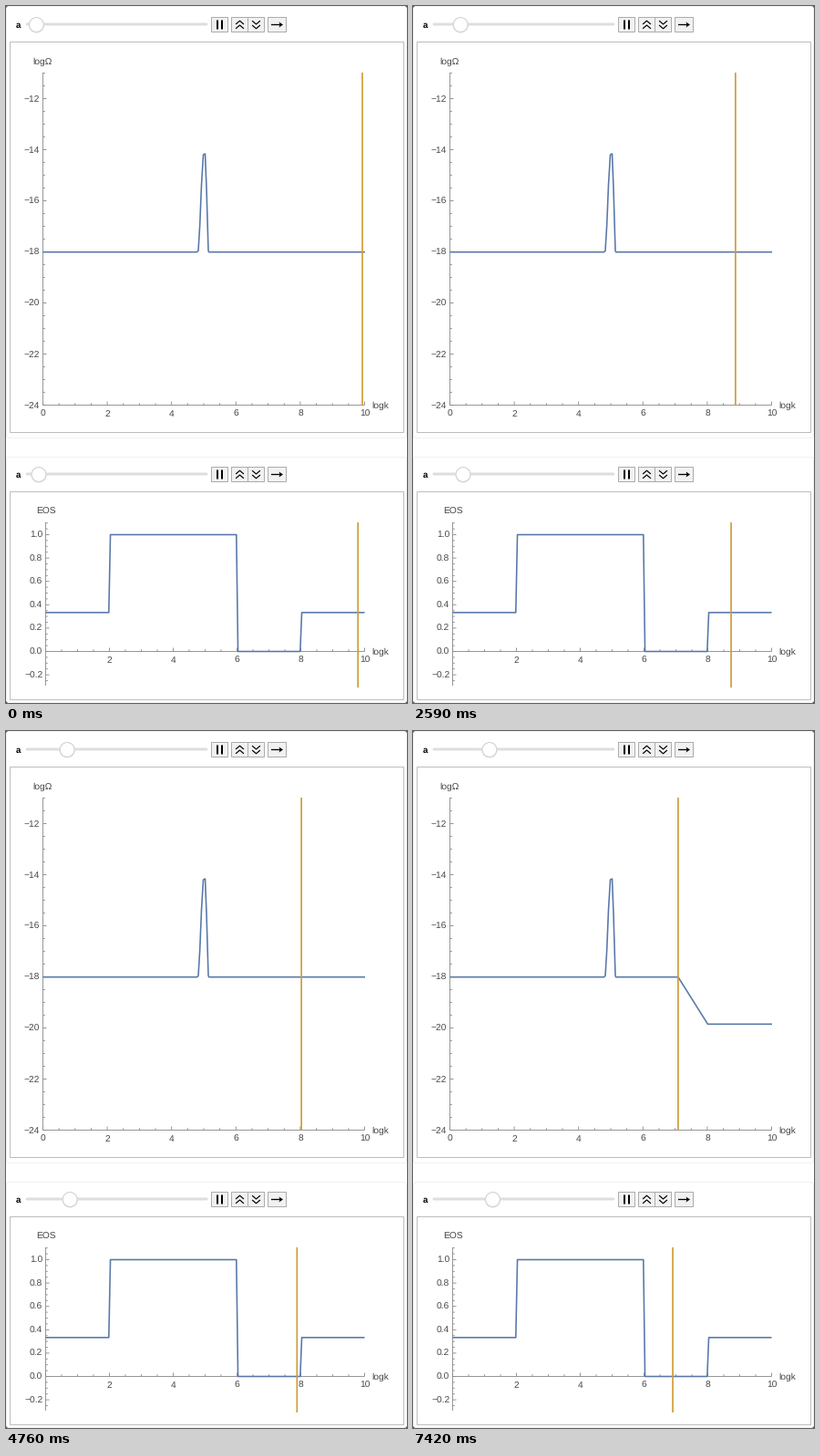
Animation, 440 px wide and 764 px high, one loop 8000 ms. Source, as a matplotlib script:

```python
import numpy as np
import matplotlib.pyplot as plt
from matplotlib.animation import FuncAnimation
from matplotlib.collections import LineCollection
from matplotlib.patches import Circle, FancyBboxPatch, Polygon, Rectangle

W, H, DPI = 440, 764, 100
LOOP, INTERVAL = 8000, 40
PX = 72 / DPI
BLUE, GOLD, AXIS, INK = "#5878aa", "#cf9d38", "#8c8c8c", "#484848"
LOWER = 493  # vertical offset of the second control row

# coordinates are given at pixel centres, so keep them as they are
plt.rcParams["path.snap"] = False
plt.rcParams["text.hinting"] = "none"

# times at which the sliders advance; LAGGED ones move the lower knob late
STEPS = np.array([350, 910, 1400, 1960, 2520, 3010, 3640, 4200,
                  4690, 5390, 6020, 6650, 7350])
LAGGED = [1400, 1960, 2520, 3010, 4690, 6020, 6650, 7350]
KNOB_STEPS = STEPS + 70 * np.isin(STEPS, LAGGED)

fig = plt.figure(figsize=(W / DPI, H / DPI), dpi=DPI, facecolor="white")
ax = fig.add_axes([0, 0, 1, 1])
ax.set_xlim(0, W)
ax.set_ylim(H, 0)
ax.axis("off")


def line(xs, ys, color, width=1.0, z=3, **kw):
    kw.setdefault("solid_capstyle", "butt")
    return ax.plot(xs, ys, color=color, lw=width * PX, zorder=z, **kw)[0]


def box(x0, y0, x1, y1, face, edge):
    ax.add_patch(Rectangle((x0, y0), x1 - x0, y1 - y0, fc=face, ec=edge,
                           lw=PX, zorder=1))


def label(x, y, text, ha="center", size=10.3, color=INK, weight="normal"):
    ax.text(x, y + 0.36 * size, text, ha=ha, va="baseline", color=color,
            fontsize=size * PX, family="Liberation Sans", weight=weight,
            zorder=6)


def number(v, digits=0):
    return f"{v:.{digits}f}".replace("-", "\u2212")


def ticks(segments):
    ax.add_collection(LineCollection(segments, colors=AXIS,
                                     linewidths=0.9 * PX, zorder=2))


def chevrons(cx, cy, up):
    s = 1 if up else -1
    for dy in (-2.4, 2.4):
        line([cx - 4.4, cx, cx + 4.4],
             [cy + dy + 1.9 * s, cy + dy - 1.9 * s, cy + dy + 1.9 * s],
             "black", 1.2, solid_joinstyle="miter")


def controls(dy):
    y = 20.5 + dy
    label(13.5, y - 0.3, "a", size=9.6, color="black", weight="bold")
    line([23, 220], [y - 0.5, y - 0.5], "#dedede", 3,
         solid_capstyle="round")
    for x0, x1 in ((225.5, 243.5), (247.5, 265.5), (265.5, 283.5),
                   (287.5, 307.5)):
        box(x0, y - 8, x1, y + 8, "#f1f1f1", "#acacac")
    for x in (232, 237):
        line([x, x], [y - 5, y + 5], "black", 2)
    chevrons(256.5, y, True)
    chevrons(274.5, y, False)
    line([291, 302], [y, y], "black", 1.3)
    ax.add_patch(Polygon([(304, y), (299.5, y - 3), (300.5, y),
                          (299.5, y + 3)], fc="black", lw=0, zorder=4))


def make_knob(y):
    shadow = Circle((0, y + 0.6), 8.6, fc="#e9e9e9", lw=0, zorder=4)
    disc = Circle((0, y), 7.9, fc="white", ec="#cbcbcb", lw=0.9 * PX,
                  zorder=5)
    ax.add_patch(shadow)
    ax.add_patch(disc)
    return shadow, disc


def panel(y0, y1, top, bottom):
    ax.add_patch(FancyBboxPatch((0.5, top), W - 1, bottom - top,
                                boxstyle="round,pad=0,rounding_size=3",
                                fc="white", ec="#f1f1f1", lw=PX, zorder=0))
    box(4.5, y0, 436.5, y1, "white", "#bdbdbd")


def top_x(v):
    return 40.5 + 35.3 * v


def top_y(v):
    return 101.5 - 28 * (v + 12)


def low_x(v):
    return 43.5 + 35 * v


def low_y(v):
    return 707.5 - 128 * v


def x_axis(to_x, y, label_y, first):
    line([to_x(0), to_x(10)], [y, y], AXIS, 0.9, 2)
    ticks([[(to_x(i / 2), y), (to_x(i / 2), y - (4 if i % 4 == 0 else 2.3))]
           for i in range(21)])
    for v in range(first, 11, 2):
        label(to_x(v), label_y, str(v))
    label(401, y - 0.5, "logk", "left")


def y_axis(x, y0, y1, to_y, values, major, digits):
    line([x, x], [y0, y1], AXIS, 0.9, 2)
    ticks([[(x, to_y(v)), (x + (4 if i % major == 0 else 2.3), to_y(v))]
           for i, v in values])
    for i, v in values:
        if i % major == 0:
            label(x - 3.2, to_y(v) - 0.4, number(v, digits), "right")


panel(39.5, 467.5, 0.5, 473.5)
panel(532.5, 760.5, 494.5, 763.5)
for cx in (0, W):
    for cy in (0, H):
        sx, sy = (2 if cx == 0 else -2), (2 if cy == 0 else -2)
        ax.add_patch(Polygon([(cx, cy), (cx + sx, cy), (cx, cy + sy)],
                             fc="#555555", lw=0, zorder=7))

controls(0)
controls(LOWER)

x_axis(top_x, 437.5, 446.5, 0)
y_axis(40.5, 73, 437.5, top_y, [(i, -24 + i / 2) for i in range(27)], 4, 0)
label(40, 60, "log\u03a9")

x_axis(low_x, 707.5, 716.5, 2)
y_axis(43.5, 566, 745, low_y, [(i, i / 20) for i in range(-5, 23)], 4, 1)
label(43.5, 553, "EOS")

third = 1 / 3
line([low_x(v) for v in (0, 1.98, 2.03, 5.98, 6.03, 7.98, 8.03, 10)],
     [low_y(v) for v in (third, third, 1, 1, 0, 0, third, third)],
     BLUE, 1.6, solid_joinstyle="round")

BASE = top_y(-18) + 0.2
EDGE = top_x(8.015)
PEAK = [(209.5, BASE), (211, 268.3), (212.7, 240), (214.5, 196),
        (216.5, 163), (218.5, 162), (220, 200), (222, 268), (222.6, BASE)]
spectrum = line([], [], BLUE, 1.6, solid_joinstyle="round")
top_mark = line([0, 0], [73, 437.5], GOLD, 1.7, 4)
low_mark = line([0, 0], [566, 747], GOLD, 1.7, 4)
top_knob, low_knob = make_knob(20.5), make_knob(20.5 + LOWER)


def travel(n, early, late):
    return early * min(n, 10) + late * max(n - 10, 0)


def place(knob, x):
    for part in knob:
        part.center = (x, part.center[1])


def draw(i):
    t = (i + 1) * INTERVAL - 1
    n = int(np.sum(STEPS <= t))
    lag = int(np.sum(KNOB_STEPS <= t))

    x = 391 - travel(n, 7.43, 8.6)
    top_mark.set_xdata([x, x])
    xb = 386.2 - travel(n, 7.43, 8.95)
    low_mark.set_xdata([xb, xb])
    place(top_knob, 33.4 + travel(n, 3.75, 4.35))
    place(low_knob, 36 + travel(lag, 3.8, 4.5))

    # beyond the marker the level falls with slope 2 until logk = 8
    start = min(x, EDGE)
    level = BASE + 56 * (EDGE - start) / 35.3
    pts = [(40.5, BASE)] + PEAK + [(start, BASE), (EDGE, level),
                                   (394, level)]
    spectrum.set_data(*zip(*pts))
    return spectrum, top_mark, low_mark, *top_knob, *low_knob


anim = FuncAnimation(fig, draw, frames=LOOP // INTERVAL, interval=INTERVAL,
                     init_func=lambda: draw(0), repeat=True, repeat_delay=0)
plt.show()
```
